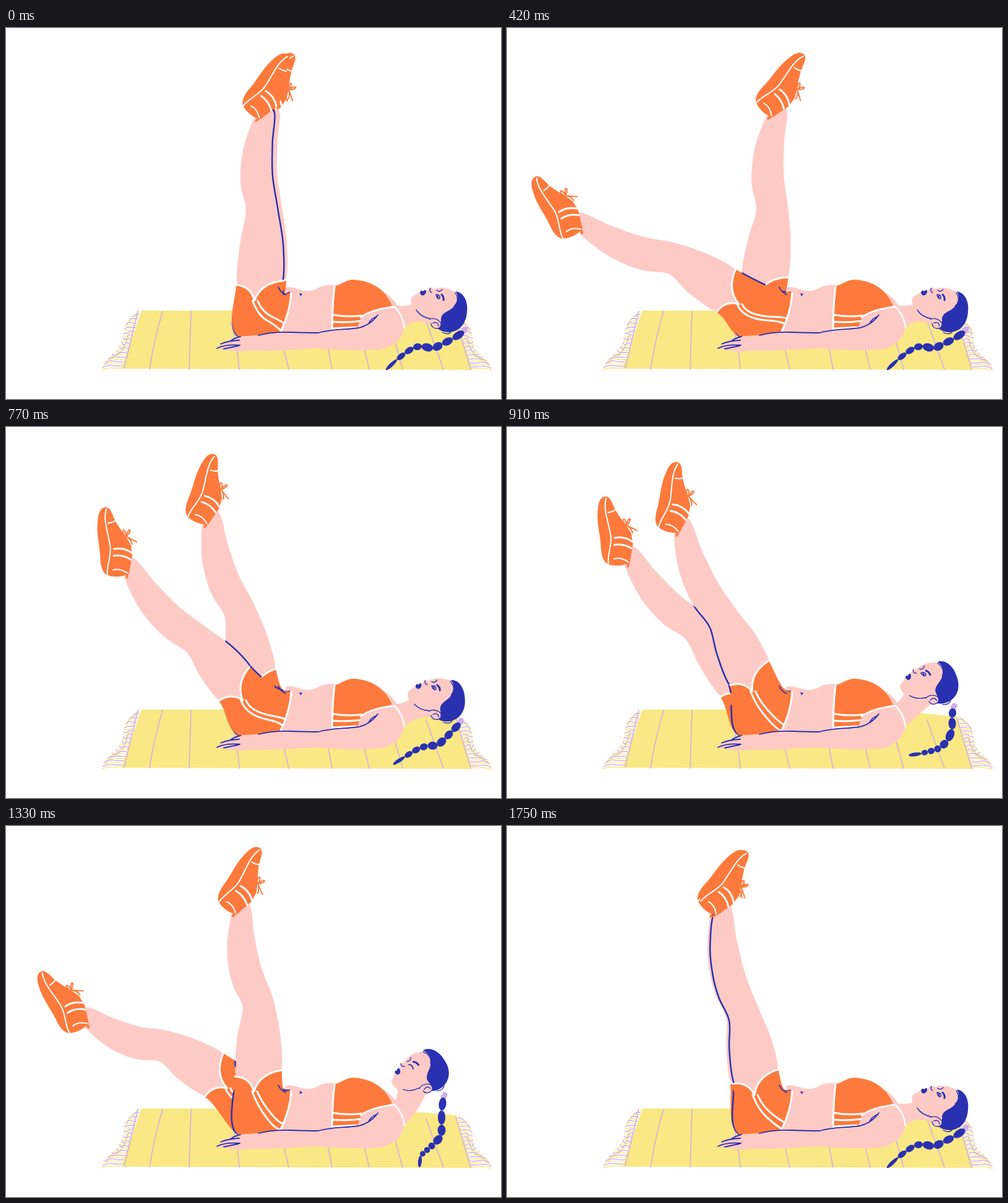
An HTML page with a canvas for the animation above (1820 ms loop, 800 px wide and 600 px high).

```html
<!DOCTYPE html>
<html lang="en">
<head>
<meta charset="utf-8">
<title>Scissor kicks</title>
<style>
  html, body { margin: 0; width: 100%; height: 100%; overflow: hidden; background: #fff; }
  canvas { display: block; width: 100vw; height: 100vh; }
</style>
</head>
<body>
<canvas id="stage" width="800" height="600"></canvas>
<script>
const ctx = document.getElementById('stage').getContext('2d');
ctx.lineCap = ctx.lineJoin = 'round';

const SKIN = '#fecac5', ORANGE = '#fd7a3c', BLUE = '#2a31b0', WHITE = '#fff';
const YELLOW = '#f9e884', LILAC = '#cfaee6';
const STEP = 70, STEPS = 26;
const rad = deg => deg * Math.PI / 180;

// Leg poses: step, hem x, hem y, thigh angle, thigh length, shin angle, shin length, foot flex
const FRONT_LEG = [
  [0, 410, 412, 89, 122, 87, 150, 3],
  [4, 389, 404, 127, 118, 135, 156, 0],
  [7, 340, 435, 157, 96, 164, 158, -3],
  [9, 350, 433, 144, 93, 149, 156, -1],
  [13, 391, 398, 116, 101, 113, 160, 2],
  [15, 415, 402, 82, 113, 90, 155, -2],
  [19, 408, 400, 91.5, 117, 99, 150, -5],
  [25, 402, 405, 101.5, 105, 101, 168, -13]
];
const BACK_LEG = [
  [0, 415, 410, 88, 121, 86.5, 150, 3],
  [4, 410, 407, 88, 117, 88, 153, 1],
  [9, 421, 400, 85, 112, 88, 151, 1],
  [13, 372, 410, 128.5, 112, 131.6, 154, 2],
  [15, 358, 421, 159.4, 102, 163.7, 160, -6],
  [17, 350, 424, 161, 100, 168, 162, -5],
  [19, 336, 403, 151, 96, 158, 131, -2],
  [24, 378, 402, 113, 108, 119, 160, -2],
  [25, 397, 405, 101, 108, 101, 165, -13]
];
const HEAD_LIFT = [[0, 0], [10, 0], [13, 0.67], [15, 1], [20, 1], [24, 0.2], [25, 0]];

// Braid joints with the head down, rising and up
const BRAID = [
  [0, 740, 491, 722, 503, 705, 511, 690, 519, 672, 514, 658, 517, 645, 526, 632, 536, 614, 553],
  [0.67, 721, 455, 719, 470, 720, 489, 712, 508, 701, 518, 691, 523, 680, 525, 670, 528, 649, 531],
  [1, 707, 439, 704, 460, 704, 483, 704, 501, 692, 514, 684, 521, 677, 527, 670, 533, 668, 552]
];
const BEAD_WIDTHS = [6, 6, 6.5, 6.5, 5.5, 5, 4.5, 3];

// Values at a position: linear, or smooth through the neighbouring keys
function sample(keys, pos, smooth) {
  let i = 0;
  while (i < keys.length - 2 && pos >= keys[i + 1][0]) i++;
  const a = keys[i], b = keys[i + 1];
  const before = keys[i - 1] || a, after = keys[i + 2] || b;
  const span = b[0] - a[0], t = (pos - a[0]) / span;
  return a.slice(1).map((start, j) => {
    const end = b[j + 1];
    if (!smooth) return start + (end - start) * t;
    const m0 = (end - before[j + 1]) / (b[0] - before[0]) * span;
    const m1 = (after[j + 1] - start) / (after[0] - a[0]) * span;
    return start + t * (m0 + t * (3 * (end - start) - 2 * m0 - m1 + t * (2 * (start - end) + m0 + m1)));
  });
}

function fill(path, color) {
  ctx.fillStyle = color;
  ctx.fill(typeof path === 'string' ? new Path2D(path) : path);
}
function line(path, color, width) {
  ctx.strokeStyle = color;
  ctx.lineWidth = width;
  ctx.stroke(typeof path === 'string' ? new Path2D(path) : path);
}
function within(region, draw) {
  ctx.save();
  ctx.clip(region);
  draw();
  ctx.restore();
}

// Closed smooth curve through the points
function loopThrough(points) {
  const path = new Path2D(), n = points.length, p = i => points[(i + n) % n];
  path.moveTo(...p(0));
  for (let i = 0; i < n; i++) {
    const [a, b, c, d] = [p(i - 1), p(i), p(i + 1), p(i + 2)];
    path.bezierCurveTo(b[0] + (c[0] - a[0]) / 6, b[1] + (c[1] - a[1]) / 6,
      c[0] - (d[0] - b[0]) / 6, c[1] - (d[1] - b[1]) / 6, ...c);
  }
  return path;
}

// Maps (along, across) of a limb to stage coordinates; positive across is the shin side
function bone([x, y], angle) {
  const ux = Math.cos(rad(angle)), uy = -Math.sin(rad(angle));
  return (along, across) => [x + ux * along - uy * across, y + uy * along + ux * across];
}

function buildLeg([x, y, thighAngle, thighLength, shinAngle, shinLength, flex]) {
  const thigh = bone([x, y], thighAngle), knee = thigh(thighLength, 0);
  const shin = bone(knee, shinAngle), L = shinLength;
  const skin = loopThrough([
    thigh(-36, 18), thigh(0, 37), thigh(thighLength * 0.5, 37),
    shin(0, 27), shin(L * 0.35, 16), shin(L * 0.7, 13), shin(L * 1.04, 13),
    shin(L * 1.02, -13), shin(L * 0.67, -32), shin(L * 0.38, -36), shin(L * 0.18, -33),
    shin(-L * 0.05, -24), thigh(thighLength * 0.5, -33), thigh(0, -37), thigh(-36, -24)
  ]);

  const back = thigh(-4, -38), front = thigh(4, 38), notch = thigh(-29, -8);
  const hem = new Path2D();
  hem.moveTo(...back);
  hem.quadraticCurveTo(...thigh(-6, -14), ...notch);
  hem.quadraticCurveTo(...thigh(0, 2), ...front);

  const frontEdge = [...thigh(-25, 38), 446, 432, 459, 426];
  const seatEdge = [355, 485, ...thigh(-25, -38), ...back];
  const shorts = new Path2D(hem);
  shorts.bezierCurveTo(...frontEdge);
  shorts.quadraticCurveTo(459, 460, 443, 494);
  shorts.lineTo(374, 499);
  shorts.bezierCurveTo(...seatEdge);

  const edges = new Path2D();
  edges.moveTo(...front);
  edges.bezierCurveTo(...frontEdge);
  edges.moveTo(374, 499);
  edges.bezierCurveTo(...seatEdge);

  const shape = new Path2D(skin);
  shape.addPath(shorts);
  return { skin, hem, shorts, edges, shape, notch, ankle: shin(L, 0), footAngle: shinAngle + flex };
}

function drawShoe({ ankle, footAngle }) {
  ctx.save();
  ctx.translate(...ankle);
  ctx.rotate(rad(135 - footAngle));
  ctx.translate(-207, -200);
  fill('M165 106C172 107 175 117 179 125C185 137 198 150 207 165L210 182L206 211C196 219 178 219 169 215C160 208 159 196 158 183C156 165 150 147 152 126C153 113 157 106 165 106Z', ORANGE);
  fill('M201 211Q206 211 205 217Q203 223 201 218Z', ORANGE);
  line('M165 109C160 127 170 148 174 170C176 187 169 200 171 215M169 132Q175 131 181 127M180 207Q190 203 203 211', WHITE, 2);
  line('M180 173Q195 169 209 178M180 184Q195 181 208 189', WHITE, 3);
  line('M197 152C189 142 196 136 199 151C202 135 210 141 199 152L216 160M199 152Q207 156 209 164', ORANGE, 2);
  ctx.restore();
}

function drawLeg(leg, behind) {
  const [nx, ny] = leg.notch;
  fill(leg.skin, SKIN);
  if (behind) within(behind.shape, () => line(leg.skin, BLUE, 2.5));
  fill(leg.shorts, ORANGE);
  within(leg.shorts, () => line(
    `M${nx - 3} ${ny}Q${nx + 6} ${ny + 24} 422 473T446 491M${nx + 5} ${ny}Q${nx + 13} ${ny + 19} 430 467T452 480`, WHITE, 3));
  line(leg.hem, WHITE, 3);
  if (behind) within(behind.shape, () => line(leg.edges, BLUE, 2.5));
  drawShoe(leg);
}

function drawFringe(x0, y0, x1, y1, side) {
  for (let i = 0; i < 27; i++) {
    const t = i / 26, wobble = Math.sin(i * 12.9) * 4;
    const x = x0 + (x1 - x0) * t, y = y0 + (y1 - y0) * t;
    const reach = side * (7 + 20 * t + wobble);
    line(`M${x} ${y}q${reach * 0.4} ${-3 + wobble} ${reach * 0.6} ${1 - wobble * 0.5}t${reach * 0.5} ${2 + wobble * 0.4}`,
      i % 2 ? LILAC : YELLOW, 1.5);
  }
}

function drawMat() {
  drawFringe(216, 460, 188, 550, -1);
  drawFringe(730, 470, 752, 551, 1);
  fill('M219 457H600L728 468L753 553L187 551Z', YELLOW);
  line('M213 458L191 550M253 458Q238 510 232 552M299 458L296 552M363 475Q374 510 377 552M447 510L457 552M519 510L527 552M577 510L587 552M628 505L641 552M679 474L707 552M727 470L751 552', LILAC, 1.5);
}

function drawTorso() {
  fill('M452 420C470 416 480 432 502 422Q514 414 533 416L600 422Q616 427 628 442L645 470L600 500L440 496Z', SKIN);
  fill('M531 418C545 413 550 407 562 407C594 409 614 425 624 449Q594 455 574 468L568 484L528 487Z', ORANGE);
  line('M531 418Q527 450 527 487M529 464Q552 468 575 465M528 475Q550 477 572 474M528 486L566 484', WHITE, 3);
  fill('M474 429L479 430L476 434Z', BLUE);
}

function drawArm() {
  fill('M574 470Q592 456 627 451Q641 462 644 486C637 508 620 519 600 520C565 523 535 520 500 518C460 520 430 523 392 522Q370 525 342 518Q340 515 354 510Q362 501 376 499L408 497C450 489 475 493 505 493C525 488 548 489 570 485Z', SKIN);
  line('M573 468Q592 454 628 451Q642 465 644 485', WHITE, 2.5);
  line('M408 497Q430 491 460 492T505 493C525 487 548 488 570 485Q590 480 601 464M586 478Q590 470 598 467M341 518Q355 511 378 513M347 511Q358 506 377 505M352 519Q365 516 376 514M363 506Q370 501 379 499', BLUE, 1.8);
}

function drawNeck(tilt) {
  const turn = (x, y) => {
    const dx = x - 609, dy = y - 472, c = Math.cos(tilt), s = Math.sin(tilt);
    return `${609 + dx * c - dy * s} ${472 + dx * s + dy * c}`;
  };
  fill(`M622 446Q631 452 ${turn(660, 447)}L${turn(692, 482)}Q664 466 644 484L610 475Z`, SKIN);
}

function drawHead(tilt, blink) {
  ctx.save();
  ctx.translate(609, 472);
  ctx.rotate(tilt);
  ctx.translate(-609, -472);
  fill('M656 434Q664 431 670 426L681 424L686 419L691 422Q709 416 728 428L732 455L702 484Q687 482 683 470Q664 463 656 451Q653 441 656 434Z', SKIN);
  fill('M727 426C742 428 747 446 745 459C744 478 733 491 716 492Q703 492 697 485Q704 481 703 470C705 458 718 459 725 449Q734 439 727 426Z', BLUE);
  fill('M669 428Q671 422 674 426Q679 421 679 427Q677 434 671 432Z', BLUE);
  line('M726 428Q734 441 724 450M663 456Q670 467 685 470M686 421Q683 425 688 428M696 424Q700 428 705 423M705 492Q714 497 719 492', BLUE, 1.4);
  line('M704 431Q708 435 707 440', BLUE, 3);
  line(blink ? 'M695 430Q700 434 696 440' : 'M695 431Q702 431 701 437Q697 440 695 431M698 433L698 436', BLUE, 1.7);
  fill('M686 473Q693 468 702 474Q706 483 698 486Q686 487 686 473Z', SKIN);
  line('M684 471Q695 467 703 477Q704 486 696 486Q688 486 687 478M690 477Q698 474 699 482', BLUE, 1.4);
  ctx.restore();
}

function drawBraid(lift) {
  const joints = sample(BRAID, lift);
  line(`M${joints[0]} ${joints[1] - 1}l2 -3`, LILAC, 9);
  BEAD_WIDTHS.forEach((width, i) => {
    const [x0, y0, x1, y1] = joints.slice(i * 2, i * 2 + 4);
    const bead = new Path2D();
    bead.ellipse((x0 + x1) / 2, (y0 + y1) / 2, Math.hypot(x1 - x0, y1 - y0) / 2, width,
      Math.atan2(y1 - y0, x1 - x0), 0, Math.PI * 2);
    fill(bead, BLUE);
  });
}

function render(now) {
  const step = Math.floor(now / STEP) % STEPS;
  const lift = sample(HEAD_LIFT, step)[0], tilt = rad(-38 * lift);
  const back = buildLeg(sample(BACK_LEG, step, true));
  const front = buildLeg(sample(FRONT_LEG, step, true));

  ctx.fillStyle = WHITE;
  ctx.fillRect(0, 0, 800, 600);
  drawMat();
  drawNeck(tilt);
  drawTorso();
  drawLeg(back);
  drawLeg(front, back);
  line('M461 429Q459 460 443 493', WHITE, 3);
  line('M440 419Q444 428 452 431', BLUE, 1.8);
  drawArm();
  drawHead(tilt, step >= 18 && step <= 20);
  drawBraid(lift);
}

const start = performance.now();
function tick() {
  render(performance.now() - start);
  requestAnimationFrame(tick);
}
tick();
</script>
</body>
</html>
```
